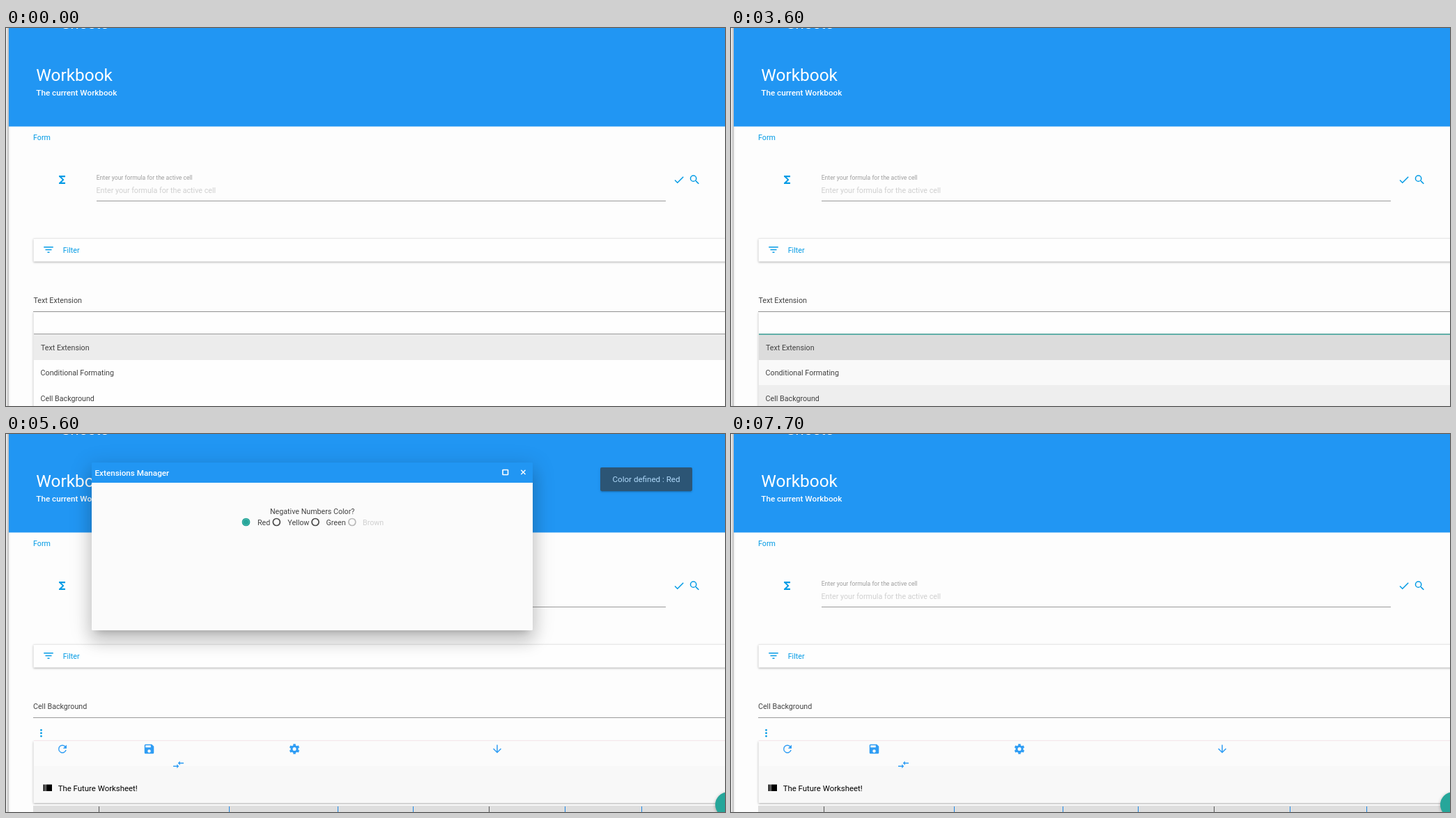
Animation, 1032 px wide and 543 px high, one loop 8000 ms. Source, as an HTML page:

```html
<!DOCTYPE html>
<html lang="en">
<head>
<meta charset="utf-8">
<title>Workbook</title>
<style>
  html, body { margin: 0; width: 100%; height: 100%; overflow: hidden; background: #fdfdfd; }
  svg { position: absolute; left: 0; top: 0; width: 1032px; height: 543px; overflow: hidden; }
  text { font: 10.7px Roboto, Arial, sans-serif; fill: #424242; white-space: pre; }
  .white { fill: #fff; }
  .blue { fill: #2196f3; }
  .link { fill: #039be5; }
  .medium { font-size: 11.7px; font-weight: 500; }
  .title { font-size: 24.4px; }
  .hint { font-size: 8.6px; fill: #9e9e9e; }
  .faint { fill: #cfcfcf; }
  .card { fill: #fefefe; filter: drop-shadow(0 1.5px 1.5px rgba(0,0,0,.32)); }
  .rule { fill: #9a9a9a; }
  .teal { fill: #26a69a; }
  .ring { fill: none; stroke: #4a4a4a; stroke-width: 1.7; }

  #modal {
    position: absolute; left: 123px; top: 41px; width: 633px; height: 241px;
    border-radius: 2px; background: linear-gradient(#2196f3 29px, #fbfbfb 29px);
    box-shadow: 0 16px 24px 2px rgba(0,0,0,.14), 0 6px 30px 5px rgba(0,0,0,.12), 0 8px 10px -7px rgba(0,0,0,.2);
  }
  #modal svg { left: -123px; top: -41px; }
  #toast {
    position: absolute; left: 853px; top: 37px; width: 132px; height: 34px;
    border-radius: 2px; background: #323232;
    box-shadow: 0 2px 2px rgba(0,0,0,.14), 0 1px 5px rgba(0,0,0,.12), 0 3px 1px -2px rgba(0,0,0,.2);
  }
  #toast svg { left: -853px; top: -37px; }

  /* One shared 8 s clock; every part switches in hard steps. */
  .timed { animation: 8s step-end infinite; }
  #list { animation-name: list; }
  #sheet { animation-name: sheet; }
  #caret { animation-name: caret; }
  #underline { animation-name: underline; }
  #row1 { animation-name: row1; }
  #row2 { animation-name: row2; }
  #row3 { animation-name: row3; }
  #modal { animation-name: modal; }
  #off { animation-name: off; }
  #on { animation-name: on; }
  #dot { animation-name: dot; transform-origin: 344.5px 126.5px; }
  #toast { animation-name: toast; }

  @keyframes list { 0% { opacity: 1; } 46.25%, 100% { opacity: 0; } }
  @keyframes sheet { 0% { opacity: 0; } 46.25%, 100% { opacity: 1; } }
  @keyframes caret {
    0%, 22.5%, 33.75%, 45%, 100% { opacity: 0; }
    17.5%, 28.75%, 40% { opacity: 1; }
  }
  @keyframes underline {
    0%, 100% { opacity: 0; }
    17.5% { opacity: .88; }
    18.75% { opacity: 1; }
    45% { opacity: .6; }
  }
  @keyframes row1 { 0% { fill: #ececec; } 31.25%, 100% { fill: #dcdcdc; } }
  @keyframes row2 { 0% { fill: #fefefe; } 31.25%, 100% { fill: #f9f9f9; } }
  @keyframes row3 { 0% { fill: #fefefe; } 37.5% { fill: #f9f9f9; } 45%, 100% { fill: #eee; } }
  @keyframes modal { 0%, 86.25%, 100% { opacity: 0; } 46.25% { opacity: 1; } }
  @keyframes off { 0% { opacity: 1; } 70%, 100% { opacity: 0; } }
  @keyframes on { 0% { opacity: 0; } 70%, 100% { opacity: 1; } }
  @keyframes dot { 0% { transform: scale(0); } 70% { transform: scale(.75); } 72.5%, 100% { transform: none; } }
  @keyframes toast {
    0%, 96.25%, 100% { opacity: 0; transform: none; }
    70% { opacity: .65; transform: translateY(11px); }
    72.5% { opacity: 1; transform: none; }
  }
</style>
</head>
<body>
<svg>
  <defs>
    <path id="sigma" d="M18 4H6v2l6.5 6L6 18v2h12v-3h-7l5-5-5-5h7z"/>
    <path id="check" d="M9 16.17 4.83 12l-1.42 1.41L9 19 21 7l-1.41-1.41z"/>
    <path id="search" d="M15.5 14h-.79l-.28-.27A6.47 6.47 0 0 0 16 9.5 6.5 6.5 0 1 0 9.5 16c1.61 0 3.09-.59 4.23-1.57l.27.28v.79l5 4.99L20.49 19zm-6 0a4.5 4.5 0 1 1 0-9 4.5 4.5 0 0 1 0 9z"/>
    <path id="filter" d="M10 18h4v-2h-4zM3 6v2h18V6zm3 7h12v-2H6z"/>
    <path id="refresh" d="M17.65 6.35A8 8 0 1 0 19.73 14h-2.08A6 6 0 1 1 12 6c1.66 0 3.14.69 4.22 1.78L13 11h7V4z"/>
    <path id="save" d="M17 3H5a2 2 0 0 0-2 2v14a2 2 0 0 0 2 2h14a2 2 0 0 0 2-2V7zm-5 16a3 3 0 1 1 0-6 3 3 0 0 1 0 6zm3-10H5V5h10z"/>
    <path id="down" d="m20 12-1.41-1.41L13 16.17V4h-2v12.17l-5.58-5.59L4 12l8 8z"/>
    <path id="compare" d="M9 14H2v2h7v3l4-4-4-4zm6-1v-3h7V8h-7V5l-4 4z"/>
    <g id="gear">
      <circle cx="12" cy="12" r="5.4" fill="none" stroke="#2f9df4" stroke-width="4"/>
      <path d="M12 2.2v4M12 17.8v4M3.5 7.1 7 9.1M17 14.9l3.5 2M3.5 16.9l3.5-2M17 9.1l3.5-2" fill="none" stroke="#2f9df4" stroke-width="4.6"/>
    </g>
  </defs>

  <rect width="1032" height="543" fill="#fdfdfd"/>
  <rect width="2" height="543" fill="#e6e6e6"/>
  <rect x="2" width="2" height="543" fill="#c6c6c6"/>
  <rect x="4" y="141" width="2" height="402" fill="#f3f3f3"/>
  <rect class="blue" x="4" width="1028" height="141.5"/>
  <text class="white" x="79" y="1" style="font-size:22.5px">Sheets</text>
  <text class="white title" x="43.3" y="75.5">Workbook</text>
  <text class="white medium" x="43.3" y="97.3">The current Workbook</text>

  <text class="link" x="39" y="160.8">Form</text>
  <g class="link">
    <use href="#sigma" transform="translate(71.5 209) scale(.75)"/>
    <use href="#check" transform="translate(957 209) scale(.75)"/>
    <use href="#search" transform="translate(979.5 209) scale(.75)"/>
  </g>
  <text class="hint" x="129.7" y="218">Enter your formula for the active cell</text>
  <text class="faint" x="129.5" y="237">Enter your formula for the active cell</text>
  <rect class="rule" x="130" y="248" width="817" height="1"/>

  <rect class="card" x="39.5" y="302.5" width="1010" height="33"/>
  <rect x="39.5" y="302" width="1010" height="1" fill="#e9e9e9"/>
  <use class="link" href="#filter" transform="translate(52 309.5) scale(.75)"/>
  <text class="link" x="81.7" y="323">Filter</text>
  <rect class="rule" x="39" y="407" width="993" height="1"/>

  <g id="list" class="timed">
    <text x="39.4" y="395">Text Extension</text>
    <rect class="card" x="39.5" y="408" width="1010" height="160"/>
    <rect class="rule" x="40" y="439" width="992" height="1"/>
    <rect id="row1" class="timed" x="40" y="440" width="992" height="37"/>
    <rect id="row2" class="timed" x="40" y="477" width="992" height="36"/>
    <rect id="row3" class="timed" x="40" y="513" width="992" height="30"/>
    <rect id="underline" class="timed teal" x="40" y="439" width="992" height="2"/>
    <rect id="caret" class="timed" x="42" y="417" width="1.3" height="14" fill="#222"/>
    <text x="50" y="463">Text Extension</text>
    <text x="49.6" y="499">Conditional Formating</text>
    <text x="49.6" y="535.7">Cell Background</text>
  </g>

  <g id="sheet" class="timed">
    <text x="39" y="395">Cell Background</text>
    <g class="link">
      <circle cx="50.5" cy="425.3" r="1.4"/>
      <circle cx="50.5" cy="429.7" r="1.4"/>
      <circle cx="50.5" cy="434.1" r="1.4"/>
    </g>
    <rect class="card" x="39.5" y="441" width="1010" height="89"/>
    <rect x="40" y="441" width="992" height="36" fill="#fbfbfb"/>
    <rect x="40" y="477" width="992" height="53" fill="#f8f8f8"/>
    <rect x="40" y="440" width="992" height="1" fill="#f4e6ea"/>
    <g fill="#2f9df4">
      <use href="#refresh" transform="translate(72 443.5) scale(.75)"/>
      <use href="#save" transform="translate(196.5 443.5) scale(.75)"/>
      <use href="#gear" transform="translate(405 443.5) scale(.75)"/>
      <use href="#down" transform="translate(696 443.5) scale(.75)"/>
      <use href="#compare" transform="translate(238.5 466) scale(.75)"/>
    </g>
    <path d="M53.5 503.5h2v9.500h-2zM56.200 503.500h1.300v9.500h-1.300zM58 503.500h8v9.500h-8z"/>
    <text x="74.700" y="513" style="font-size:11.4px;fill:#000">The Future Worksheet!</text>
    <rect x="39" y="534" width="993" height="9" fill="#dedede"/>
    <path d="M133.5 535v8M693.5 535v8" stroke="#555"/>
    <path d="M320.5 535v8M476.500 535v8M584.500 535v8M802.500 535v8M912.500 535v8" stroke="#1e88e5"/>
    <circle class="teal" cx="1036" cy="532.500" r="18" style="filter:drop-shadow(0 1px 2px rgba(0,0,0,.3))"/>
  </g>
</svg>

<div id="modal" class="timed">
  <svg>
    <text class="white medium" x="127.500" y="59.500">Extensions Manager</text>
    <rect x="713" y="51.500" width="7.500" height="7" rx=".5" fill="none" stroke="#fff" stroke-width="1.600"/>
    <path d="m739.300 51.800 6.200 6.200m0-6.200-6.200 6.200" stroke="#fff" stroke-width="1.400"/>
    <text x="379" y="114.600">Negative Numbers Color?</text>
    <circle id="off" class="timed ring" cx="344.500" cy="126.500" r="5"/>
    <g id="on" class="timed">
      <circle class="ring" cx="344.500" cy="126.500" r="5" style="stroke:#26a69a"/>
      <circle id="dot" class="timed teal" cx="344.500" cy="126.500" r="6"/>
    </g>
    <circle class="ring" cx="388.300" cy="126.500" r="5"/>
    <circle class="ring" cx="444" cy="126.500" r="5"/>
    <circle class="ring" cx="496.800" cy="126.500" r="5" style="stroke:#b8b8b8"/>
    <text x="361" y="130.500">Red</text>
    <text x="404.300" y="130.500">Yellow</text>
    <text x="459.500" y="130.500">Green</text>
    <text class="faint" x="512" y="130.500">Brown</text>
  </svg>
</div>

<div id="toast" class="timed">
  <svg><text class="white" x="870.500" y="58" style="font-size:11.6px">Color defined : Red</text></svg>
</div>
</body>
</html>
```
